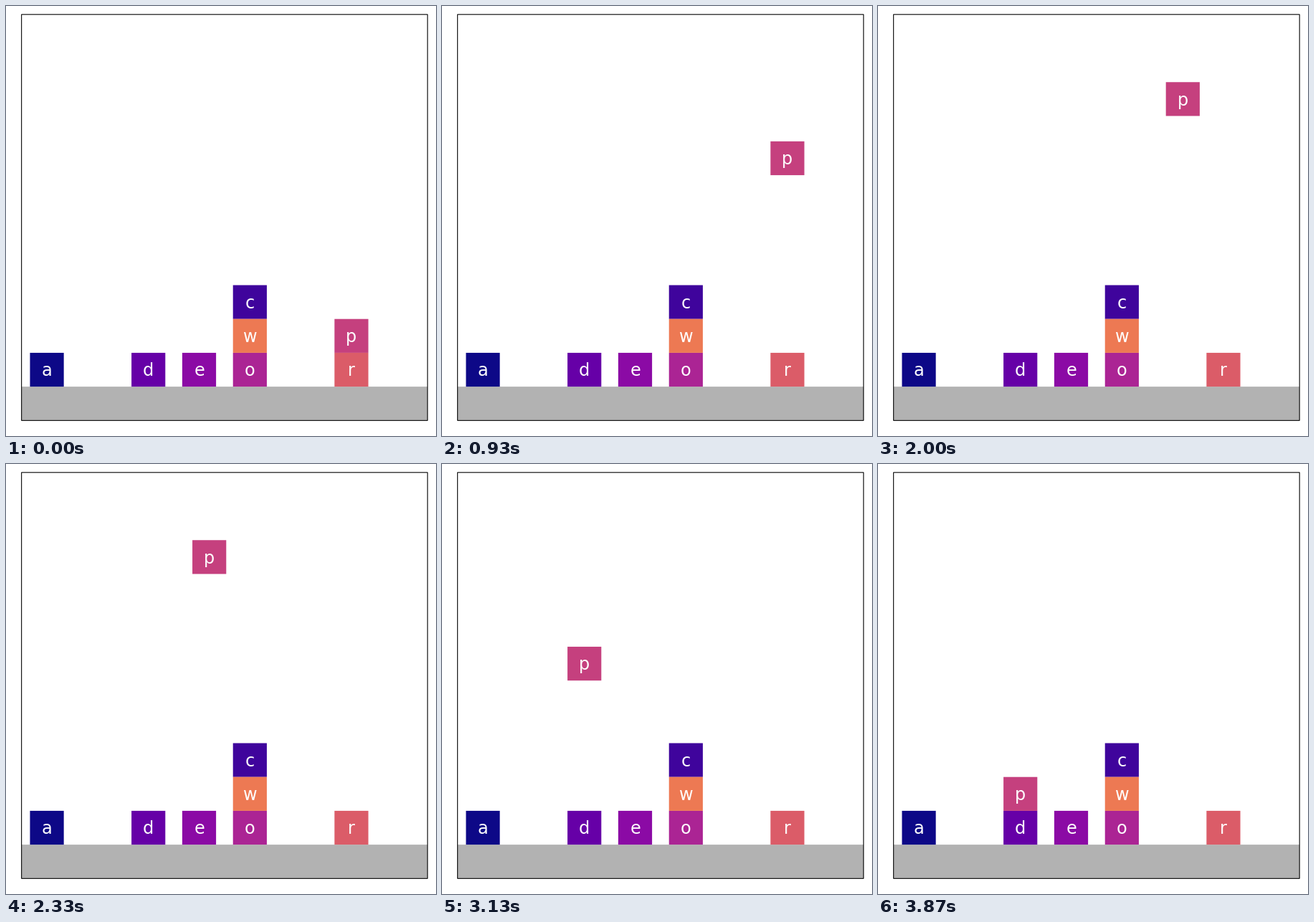
A matplotlib script for the animation above (3940 ms loop, 600 px wide and 600 px high).

```python
import matplotlib.pyplot as plt
import numpy as np
from matplotlib.animation import FuncAnimation
from matplotlib.patches import Rectangle

SIZE, DPI = 600, 100
LOOP, TICK, FPS = 3940, 10, 15
LAST_POSE = 58

# Board edges in pixels, measured from the bottom left; 12 units each way
NEAR, FAR = 21.65, 588.19
UNIT = (FAR - NEAR) / 12
PT = 72 / DPI
FONT_PX = 24
CAP = 0.365 * FONT_PX / UNIT

START, TARGET = (9.25, 2), (3.25, 2)
LIFT = 9

fig = plt.figure(figsize=(SIZE / DPI, SIZE / DPI), dpi=DPI, facecolor="white")
side = (FAR - NEAR) / SIZE
ax = fig.add_axes([NEAR / SIZE, NEAR / SIZE, side, side])
ax.set(xlim=(0, 12), ylim=(0, 12))
ax.axis("off")


def add_rect(x, y, w, h, **style):
    return ax.add_patch(Rectangle((x, y), w, h, snap=False, **style))


def add_block(name, x, y, color):
    box = add_rect(x, y, 1, 1, fc=color, lw=0)
    label = ax.text(x + 0.5, y + 0.5 - CAP, name, color="white",
                    family="DejaVu Sans", size=FONT_PX * PT,
                    ha="center", va="baseline")
    return box, label


add_rect(0, 0, 12, 1, fc="#b2b2b2", lw=0)
add_rect(0, 0, 12, 12, fill=False, ec="black", lw=1.1 * PT,
         clip_on=False, zorder=5)

names = "acdeoprw"
shades = dict(zip(names, plt.get_cmap("plasma")(np.linspace(0, 2 / 3, 8))))
places = {"a": (0.25, 1), "d": (3.25, 1), "e": (4.75, 1), "o": (6.25, 1),
          "w": (6.25, 2), "c": (6.25, 3), "r": (9.25, 1), "p": START}
blocks = {n: add_block(n, *places[n], shades[n]) for n in names}
box, label = blocks["p"]


def position(pose):
    """Lift for 20 steps, wait, carry across for 10, lower for 20."""
    (x0, y0), (x1, y1) = START, TARGET
    if pose == 0:
        return START
    if pose < 30:
        return x0, y0 + (LIFT - y0) * min(pose + 1, 20) / 20
    if pose <= 38:
        return x0 + (x1 - x0) * (pose - 28) / 10, LIFT
    return x1, LIFT + (y1 - LIFT) * (pose - 38) / 20


def update(i):
    pose = min((i * TICK + 5) * FPS // 1000, LAST_POSE)
    x, y = position(pose)
    box.set_xy((x, y))
    label.set_position((x + 0.5, y + 0.5 - CAP))
    return box, label


anim = FuncAnimation(fig, update, frames=LOOP // TICK, interval=TICK,
                     repeat=True, repeat_delay=0)
plt.show()
```
